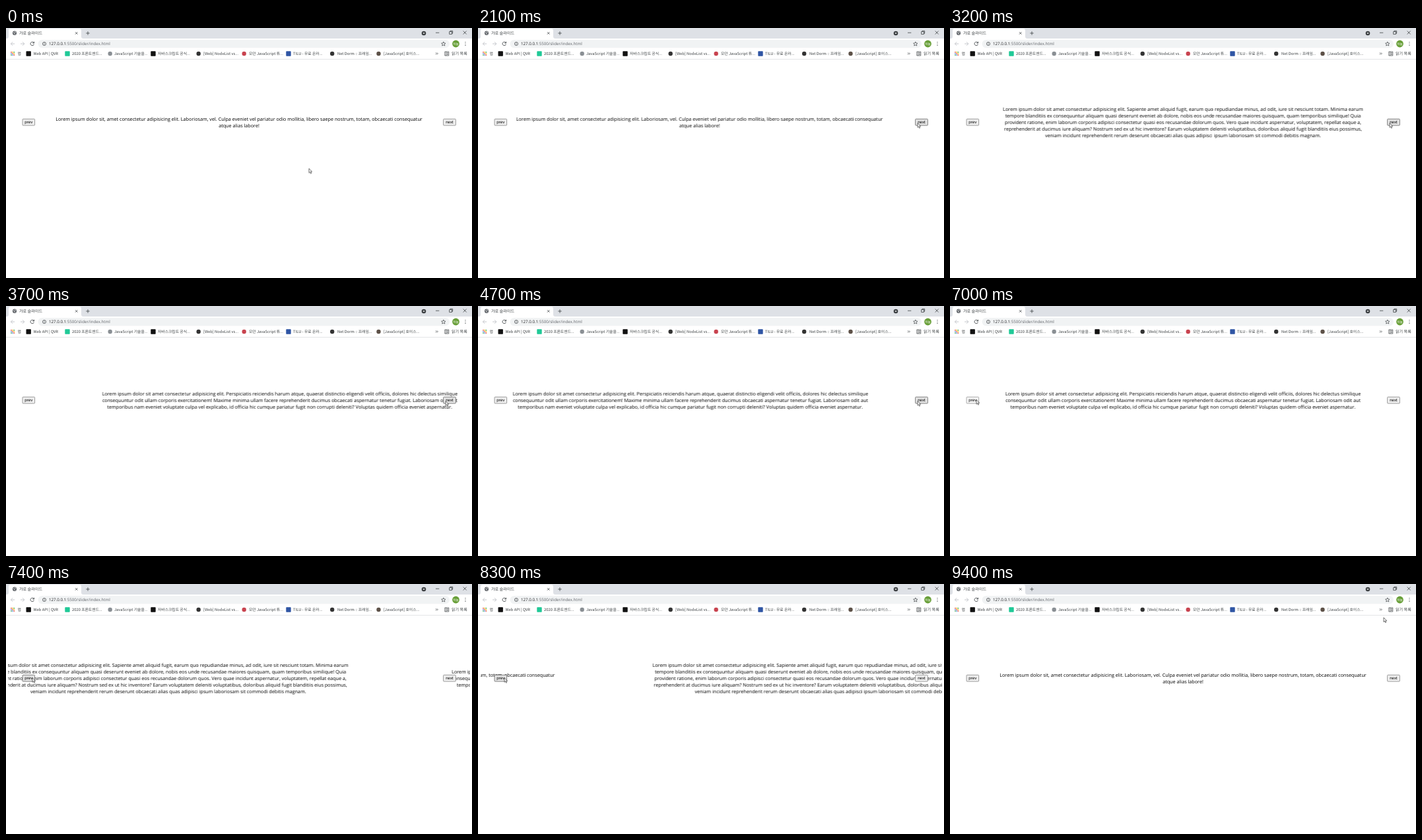
Animation, 706 px wide and 380 px high, one loop 9.5 s. Source, as an HTML page:

```html
<!DOCTYPE html>
<html lang="en">
<head>
<meta charset="utf-8">
<title>Slider</title>
<style>
html, body { margin: 0; width: 100%; height: 100%; overflow: hidden; background: #fff; }
svg { display: block; width: 706px; height: 380px; }
text { text-rendering: geometricPrecision; white-space: pre; }
.ui { font: 5.8px "Noto Sans CJK KR", "Noto Sans CJK", sans-serif; fill: #3c4043; }
.url { font: 6.18px "Open Sans", sans-serif; fill: #5f6368; }
.copy { font: 7.23px "Open Sans", "Noto Sans", sans-serif; fill: #000; text-anchor: middle; }
.label { font: 6.2px "Liberation Sans", Arial, sans-serif; fill: #000; text-anchor: middle; }
.line { fill: none; stroke: #3c4043; stroke-width: .8; }
.btn { fill: #efefef; stroke: #767676; stroke-width: .7; }

#track { animation: slide 9500ms ease infinite; }
#next { animation: overNext 9500ms step-end infinite; }
#prev { animation: overPrev 9500ms step-end infinite; }
#cursor { animation: point 9500ms linear infinite; }

@keyframes slide {
  0%, 21.9% { transform: translateX(0); }
  27.16%, 35.58% { transform: translateX(-698.6px); }
  40.84%, 49.16% { transform: translateX(-1397.2px); }
  54.42%, 63.62% { transform: translateX(-2095.8px); }
  68.88%, 75.02% { transform: translateX(-1397.2px); }
  80.28%, 86.4% { transform: translateX(-698.6px); }
  91.66%, 100% { transform: translateX(0); }
}
@keyframes overNext {
  0%, 55.5%, 100% { fill: #efefef; stroke: #767676; }
  13.6% { fill: #e3e3e3; stroke: #555; }
}
@keyframes overPrev {
  0%, 92.2%, 100% { fill: #efefef; stroke: #767676; }
  60.9%, 75% { fill: #e3e3e3; stroke: #555; }
  73.5% { fill: #f5f5f5; stroke: #8d8d8d; }
}
@keyframes point {
  0% { transform: translate(459px, 213.5px); }
  3.16% { transform: translate(454px, 224px); }
  6.32% { transform: translate(507px, 206px); }
  10.53% { transform: translate(644px, 149px); }
  13.68%, 17.8% { transform: translate(665.4px, 144px); }
  17.89%, 55.26% { transform: translate(666px, 144.5px); }
  56.84% { transform: translate(520px, 136px); }
  58.95% { transform: translate(200px, 132px); }
  61.05%, 92.1% { transform: translate(40px, 142.5px); }
  94.74% { transform: translate(190px, 44px); }
  95.79% { transform: translate(450px, 26px); }
  96.84%, 100% { transform: translate(657px, 51px); }
}
</style>
</head>
<body>
<svg viewBox="0 0 706 380">
  <defs><clipPath id="view"><rect x="3.7" y="48" width="698.6" height="332"/></clipPath></defs>

  <!-- tab strip -->
  <rect width="706" height="16" fill="#dee1e6"/>
  <path d="M1 16Q4 16 4 13V4Q4 1 7 1H111Q114 1 114 4V13Q114 16 117 16Z" fill="#fff"/>
  <circle cx="13" cy="7.7" r="3.1" fill="#5f6368"/>
  <path d="M10.8 7q1.6-.2 2 1t1.2 1.7M13.2 5.2q.3 1.4 2 1.5" fill="none" stroke="#fff" stroke-width=".8"/>
  <text class="ui" x="20" y="10" style="font-size:6.1px">가로 슬라이드</text>
  <path class="line" d="M105 6.2l3.4 3.4M108.4 6.2l-3.4 3.4M121.3 7.9h5.4M124 5.2v5.4"/>
  <circle cx="633" cy="8" r="3.3" fill="#3c4043"/>
  <path d="M631.4 7.2h3.2l-1.6 2Z" fill="#fff"/>
  <path class="line" stroke-width=".7" d="M651 7.2h5.3M671.7 5.6h3.8v3.8h-3.8ZM672.9 5.4v-1h3.8v3.8h-1M692.7 4.5l5 5M697.7 4.5l-5 5"/>

  <!-- toolbar -->
  <path class="line" style="stroke:#b9bcc0" d="M13.2 24H7.4M10.2 21.2L7.4 24l2.8 2.8M22 24h5.8M25 21.2l2.8 2.8-2.8 2.8"/>
  <path class="line" style="stroke-width:.9" d="M41.8 22.1A2.7 2.7 0 1 0 42.4 24.7M42.5 20.8v2.2h-2.2"/>
  <rect x="48.5" y="18" width="623.5" height="12.2" rx="6.1" fill="#f1f3f4"/>
  <circle class="line" cx="58" cy="24" r="2.6" style="stroke-width:.7"/>
  <path class="line" d="M58 23.6v1.8M58 22.2v.7"/>
  <text class="url" x="65" y="26.3"><tspan fill="#202124">127.0.0.1</tspan>:5500/slider/index.html</text>
  <path class="line" style="stroke-width:.7" d="M662.8 20.9l.9 2.1 2.3.2-1.7 1.5.5 2.3-2-1.2-2 1.2.5-2.3-1.7-1.5 2.3-.2Z"/>
  <circle cx="681.5" cy="24" r="5.4" fill="#689f38"/>
  <text class="ui" x="681.5" y="25.8" text-anchor="middle" style="font-size:4.6px;fill:#fff">하늘</text>
  <path d="M696 21.6v.01M696 24v.01M696 26.4v.01" stroke="#3c4043" stroke-width="1.2" stroke-linecap="round"/>

  <!-- bookmarks -->
  <g id="apps"></g>
  <text class="ui" x="17.6" y="41.2">앱</text>
  <g id="marks"></g>
  <path class="line" style="stroke-width:.7" d="M651 37.4l1.4 1.5-1.4 1.5M653 37.4l1.4 1.5-1.4 1.5M664.8 36h6v6h-6ZM666.8 36v6M667.9 37.6h2M667.9 39h2M667.9 40.4h2"/>
  <text class="ui" x="675" y="41.3" style="font-size:6.1px">읽기 목록</text>
  <rect y="47" width="706" height=".8" fill="#dcdfe3"/>

  <!-- page -->
  <g clip-path="url(#view)"><g id="track"></g></g>
  <rect class="btn" id="prev" x="25" y="138.3" width="18.6" height="9.8" rx="1"/>
  <text class="label" x="34.3" y="145.1">prev</text>
  <rect class="btn" id="next" x="662.6" y="138.3" width="18.8" height="9.8" rx="1"/>
  <text class="label" x="672" y="145.1">next</text>

  <path id="cursor" d="M0 0V6.6L1.5 5.3 2.6 7.7 3.7 7.2 2.6 4.9H4.7Z" fill="#fff" stroke="#222" stroke-width=".65" stroke-linejoin="round"/>
</svg>
<script>
const $ = id => document.getElementById(id);
const add = (parent, tag, attrs, text = "") => {
  const el = document.createElementNS("http://www.w3.org/2000/svg", tag);
  for (const key in attrs) el.setAttribute(key, attrs[key]);
  el.textContent = text;
  parent.append(el);
};

const slides = [
  ["Lorem ipsum dolor sit, amet consectetur adipisicing elit. Laboriosam, vel. Culpa eveniet vel pariatur odio mollitia, libero saepe nostrum, totam, obcaecati consequatur",
   "atque alias labore!"],
  ["Lorem ipsum dolor sit amet consectetur adipisicing elit. Sapiente amet aliquid fugit, earum quo repudiandae minus, ad odit, iure sit nesciunt totam. Minima earum",
   "tempore blanditiis ex consequuntur aliquam quasi deserunt eveniet ab dolore, nobis eos unde recusandae maiores quisquam, quam temporibus similique! Quia",
   "provident ratione, enim laborum corporis adipisci consectetur quasi eos recusandae dolorum quos. Vero quae incidunt aspernatur, voluptatem, repellat eaque a,",
   "reprehenderit at ducimus iure aliquam? Nostrum sed ex ut hic inventore? Earum voluptatem deleniti voluptatibus, doloribus aliquid fugit blanditiis eius possimus,",
   "veniam incidunt reprehenderit rerum deserunt obcaecati alias quas adipisci ipsum laboriosam sit commodi debitis magnam."],
  ["Lorem ipsum dolor sit amet consectetur adipisicing elit. Perspiciatis reiciendis harum atque, quaerat distinctio eligendi velit officiis, dolores hic delectus similique",
   "consequuntur odit ullam corporis exercitationem! Maxime minima ullam facere reprehenderit ducimus obcaecati aspernatur tenetur fugiat. Laboriosam odit aut",
   "temporibus nam eveniet voluptate culpa vel explicabo, id officia hic cumque pariatur fugit non corrupti deleniti? Voluptas quidem officia eveniet aspernatur."],
  ["Lorem ipsum dolor sit amet consectetur, adipisicing elit. Tenetur, sed incidunt vero nam qui iure tempora sunt odio aspernatur sapiente saepe fugit officia nemo. Ab",
   "accusantium eaque suscipit harum quam nisi architecto iure assumenda nulla, optio sed! Fugiat dolorum temporibus soluta",
   "quisquam quidem dolores ut illo ea, obcaecati totam, quae a aliquam nobis excepturi at nesciunt, repellat alias et in deleniti? Vero fuga temporibus, enim ipsum",
   "fugiat quaerat odit! Impedit, officia. Ratione, nostrum. Corporis, illum."]
];
// the second line of the last slide has one more clause
slides[3][1] = slides[3][1].replace("Fugiat", "Fugiat laudantium officiis sunt enim. Fugiat").replace("Fugiat laudantium", "Laudantium");
slides[3][1] = "accusantium eaque suscipit harum quam nisi architecto iure assumenda nulla, optio sed! Laudantium officiis sunt enim. Fugiat dolorum temporibus soluta";

slides.forEach((lines, s) => lines.forEach((line, i) => add($("track"), "text", {
  class: "copy", x: 353 + s * 698.6, y: 146.4 + (i - (lines.length - 1) / 2) * 10
}, line)));

const dots = ["#ea4335", "#fbbc04", "#34a853", "#4285f4"];
for (let i = 0; i < 9; i++) {
  add($("apps"), "rect", {
    x: 7.2 + i % 3 * 2.2, y: 36 + Math.floor(i / 3) * 2.2, width: 1.5, height: 1.5, fill: dots[i % 4]
  });
}

// icon x, text x, colour, round icon, label
const marks = [
  [30.5, 41.5, "#111", 0, "Web API | QVR"],
  [89.3, 100, "#20c997", 0, "2020 프론트엔드..."],
  [154.5, 164, "#8a8f94", 1, "JavaScript 기술을..."],
  [219.3, 230, "#111", 0, "자바스크립트 공식..."],
  [288.5, 299, "#333", 1, "[Web] NodeList vs..."],
  [357.5, 368, "#c8434f", 1, "모던 JavaScript 튜..."],
  [424.3, 435, "#2f55a4", 0, "TILU - 무료 온라..."],
  [491, 502, "#333", 1, "Net Dorm :: 프래임..."],
  [561.3, 572, "#5d5148", 1, "[JavaScript] 호이스..."]
];
for (const [x, tx, fill, round, label] of marks) {
  const size = round ? 6.4 : 7.4;
  add($("marks"), "rect", { x, y: 39 - size / 2, width: size, height: size, rx: round ? size / 2 : .8, fill });
  add($("marks"), "text", { class: "ui", x: tx, y: 41.2 }, label);
}
</script>
</body>
</html>
```
